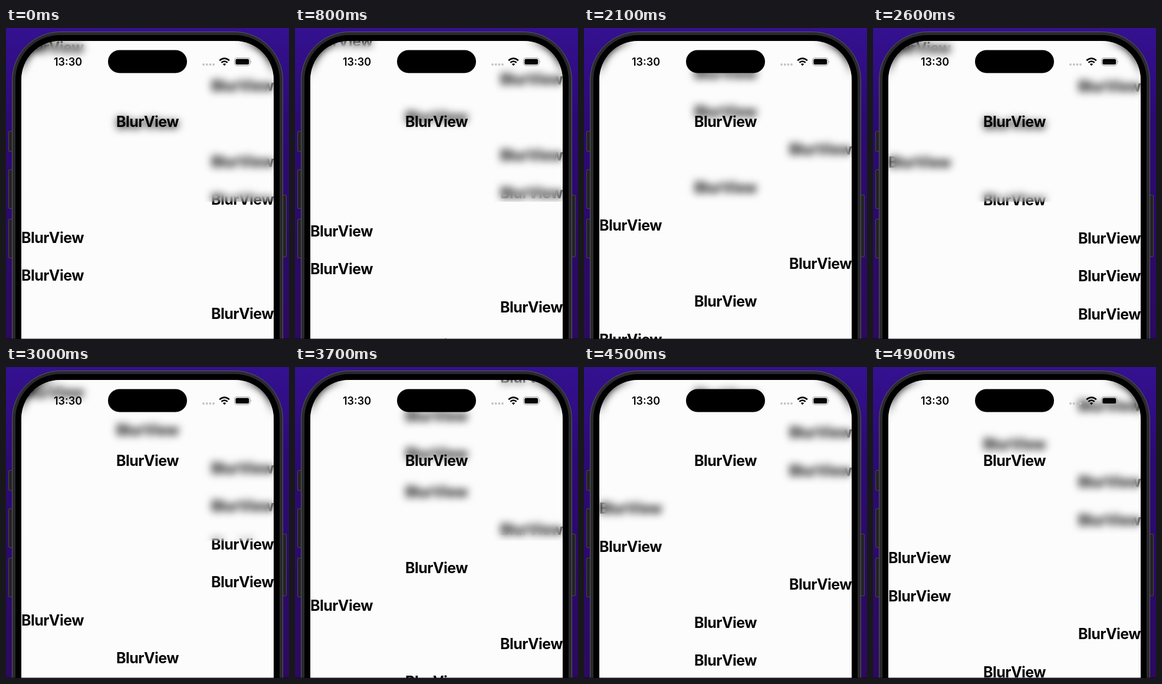
An HTML page that plays this animation: 480 by 528 pixels, repeating every 5 s.

```html
<!DOCTYPE html>
<html lang="en">
<head>
<meta charset="utf-8">
<title>Blur over a scrolling list</title>
<style>
  html, body { margin: 0; width: 100%; height: 100%; overflow: hidden; }
  body { background: #2b0a68; font-family: Inter, Roboto, "Liberation Sans", sans-serif; }
  .stage { position: relative; width: 480px; height: 528px; overflow: hidden; }
  svg { position: absolute; left: 0; top: 0; }
  .screen {
    position: absolute; left: 26px; top: 22px; width: 428px; height: 506px;
    border-radius: 66px 66px 0 0; overflow: hidden; background: #fcfcfc;
  }
  .list { position: absolute; left: 0; right: 0; top: 0; }
  .row, .label {
    color: #050505; font-size: 25px; font-weight: 700; letter-spacing: -.55px;
    white-space: nowrap;
  }
  .row { height: 64.5px; line-height: 64.5px; }
  .L { text-align: left; }
  .C { text-align: center; }
  .R { text-align: right; }
  .extra { display: none; }
  .late .extra { display: block; }
  .late { margin-top: -64.5px; }
  .blur {
    position: absolute; left: 0; top: 0; width: 100%; height: 273px;
    -webkit-backdrop-filter: blur(7px); backdrop-filter: blur(7px);
  }
  .label {
    position: absolute; left: 0; right: 0; top: 117px; height: 40px;
    line-height: 40px; text-align: center;
  }
</style>
</head>
<body>
<div class="stage">
  <svg width="480" height="528">
    <defs>
      <linearGradient id="wall" x1="0" y1="0" x2="0" y2="1">
        <stop offset="0" stop-color="#341190"/>
        <stop offset=".3" stop-color="#2c0a74"/>
        <stop offset="1" stop-color="#2b0a5e"/>
      </linearGradient>
    </defs>
    <rect width="480" height="528" fill="url(#wall)"/>
    <g fill="#222225" stroke="#47474b">
      <rect x="4.5" y="175.5" width="9" height="34" rx="1.5"/>
      <rect x="4.5" y="240.5" width="9" height="66" rx="1.5"/>
      <rect x="4.5" y="324.5" width="9" height="66" rx="1.5"/>
      <rect x="466.500" y="283.5" width="9" height="105" rx="1.5"/>
    </g>
    <rect x="10.5" y="6.500" width="459" height="640" rx="82" fill="#2a2a2d" stroke="#58585c"/>
    <rect x="16" y="12" width="448" height="640" rx="76"/>
  </svg>

  <div class="screen">
    <div class="list"></div>
    <div class="blur"></div>
    <div class="label">BlurView</div>
  </div>

  <svg width="480" height="528">
    <rect x="173" y="37.5" width="134" height="39" rx="19.500"/>
    <text x="105" y="64" text-anchor="middle" font-size="18" font-weight="600" fill="#080808">13:30</text>
    <g fill="#c3c3c5">
      <circle cx="335" cy="62" r="1.900"/>
      <circle cx="340.700" cy="62" r="1.900"/>
      <circle cx="346.400" cy="62" r="1.900"/>
      <circle cx="352" cy="62" r="1.900"/>
    </g>
    <g fill="none" stroke="#050505" stroke-width="2.600">
      <path d="M362.200 55.300Q370.500 47.900 378.800 55.300"/>
      <path d="M365.300 58.700Q370.500 54.300 375.700 58.700"/>
    </g>
    <path d="M367.800 61.300Q370.500 59.300 373.200 61.300L370.500 64.200Z" fill="#050505"/>
    <rect x="387.500" y="50.700" width="26.500" height="13.200" rx="4.200" fill="none" stroke="#a3a3a5" stroke-width="1.100"/>
    <rect x="389.300" y="52.500" width="22.900" height="9.600" rx="2.700" fill="#050505"/>
    <path d="M415.300 55.300Q417.300 57.300 415.300 59.300Z" fill="#a3a3a5"/>
    <rect y="527" width="480" height="1" fill="#000" opacity=".5"/>
  </svg>
</div>

<script>
  const LOOP = 5000, STEP = 100, LATE = 2700;
  const HEAD = 'LRCRRLLRCC', TAIL = 'RCLRCLCRRRRLCLR';
  const list = document.querySelector('.list');

  function addRow(side, extra) {
    const row = document.createElement('div');
    row.className = 'row ' + side + (extra ? ' extra' : '');
    row.textContent = 'BlurView';
    list.append(row);
  }
  for (const side of HEAD) addRow(side);
  addRow('C', true);
  for (const side of TAIL) addRow(side);

  // time in ms, scroll offset in px, speed in px per step
  const KEYS = [
    [700, 0, 0], [1300, 236.5, 42], [2100, 472, 18], [3000, 958, 0],
    [3700, 402.5, -62], [4500, 51, -28], [4900, -32.5, -14]
  ];

  function scrollAt(t) {
    if (t <= KEYS[0][0]) return KEYS[0][1];
    const i = KEYS.findIndex(k => k[0] >= t);
    const [t0, p0, v0] = KEYS[i - 1], [t1, p1, v1] = KEYS[i];
    const n = (t1 - t0) / STEP, u = (t - t0) / (t1 - t0), w = 1 - u;
    return w * w * (1 + 2 * u) * p0 + u * u * (3 - 2 * u) * p1
      + n * u * w * (w * v0 - u * v1);
  }

  const start = performance.now();
  function draw() {
    const now = (performance.now() - start) % LOOP;
    const t = Math.floor(now / STEP) * STEP;
    list.classList.toggle('late', t >= LATE);
    // the first row is centred 11.5px below the top of the screen
    list.style.transform = `translateY(${11.5 - 32.25 - scrollAt(t)}px)`;
    requestAnimationFrame(draw);
  }
  draw();
</script>
</body>
</html>
```
